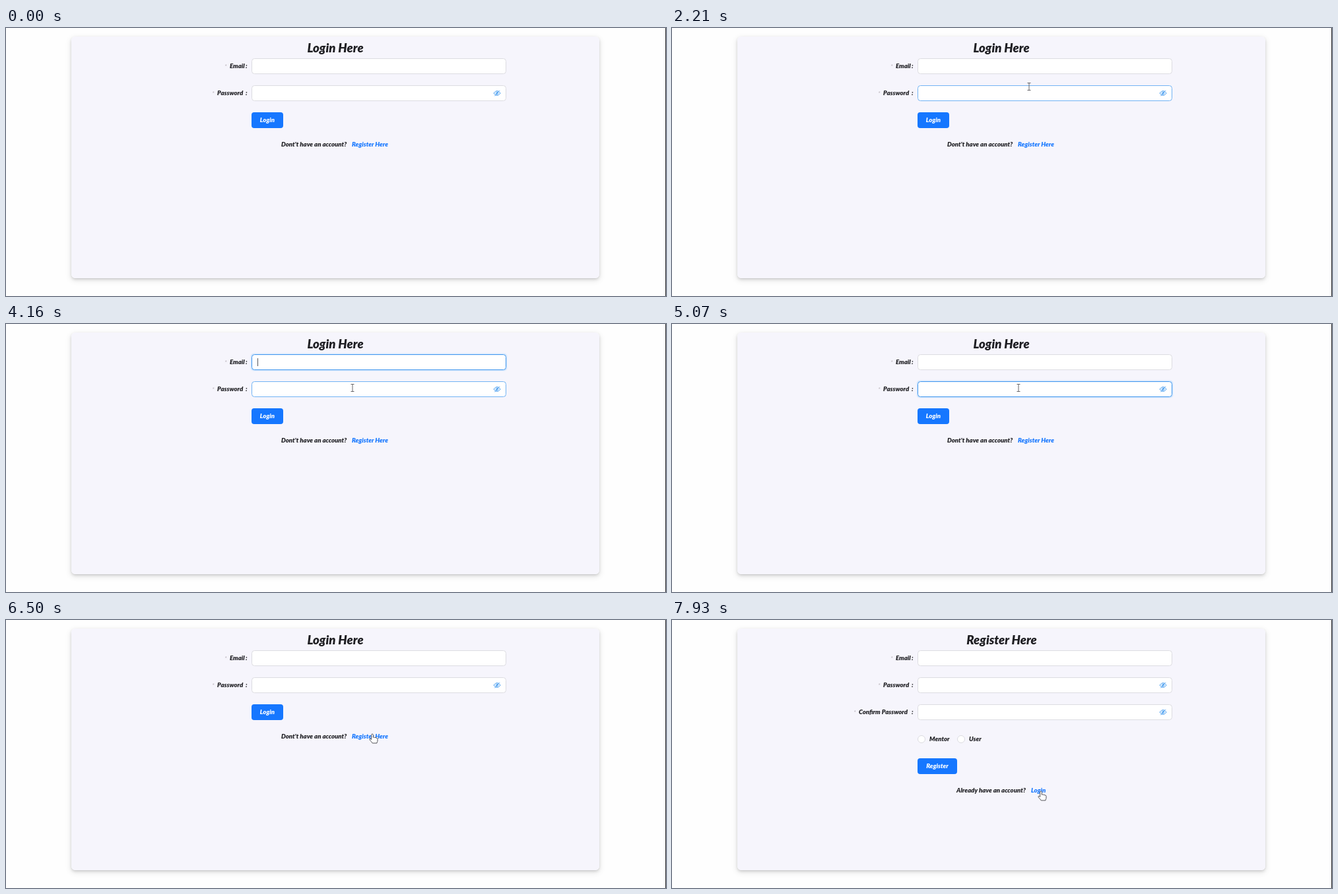
Animation of 1000 by 407 pixels, one loop 8 s. Source, as an HTML page:

```html
<!DOCTYPE html>
<html lang="en">
<head>
<meta charset="utf-8">
<title>Login and register</title>
<style>
html, body { margin: 0; width: 100%; height: 100%; overflow: hidden; background: #fefefe; }
.card, .shadow { position: absolute; left: 99px; top: 13px; width: 800px; height: 367px; border-radius: 6px; box-sizing: border-box; }
.shadow { box-shadow: 0 1px 2px -1px rgba(0,0,0,.16), 0 2px 4px rgba(0,0,0,.13), 0 3px 8px 2px rgba(0,0,0,.07); }
.card { background: #f6f5fc; border: 1px solid transparent; }
svg { position: absolute; left: 0; top: 0; }
text { font: italic 900 9.6px Lato, sans-serif; fill: #1f1f23; }
.title { font-size: 18.6px; text-anchor: middle; }
.star { fill: #b9b4bb; font-weight: 400; }
.link { fill: #1677ff; }
.button { fill: #1677ff; }
.caption { fill: #fff; text-anchor: middle; }
.field, .radio { fill: #fff; stroke: #dcdce1; }
.glow { fill: none; stroke: #0591ff; stroke-opacity: .13; stroke-width: 2; }
.eye { fill: none; stroke: #3492ee; stroke-width: .9; }
.hand { fill: #fff; stroke: #55555a; stroke-linejoin: round; }
.beam { fill: none; stroke: #66666b; }
</style>
</head>
<body>
<div class="shadow" id="shadow"></div>
<div class="card" id="card"></div>
<svg width="1000" height="407" viewBox="0 0 1000 407">
  <g id="shared"></g>
  <g id="login"></g>
  <g id="register"></g>
  <path id="caret" d="M381.5 -6v12" stroke="#55555a"/>
  <g id="pointer">
    <path id="hand" class="hand" d="M-1.3 7V.4a1.3 1.3 0 0 1 2.6 0V4.3q1.2-.8 2.4.3q1.3-.7 2.3.5q1.9-.3 2 1.5V9q0 1.5-1 3v1H.2q-1.4-2.2-4-4.8q-.8-1.6.7-1.8q1 .1 1.8 1.2z"/>
    <path id="beam" class="beam" d="M-2.5-5.5h5M0-5.5v11M-2.5 5.5h5"/>
  </g>
  <path d="M999.5 0v407" stroke="#2b2b2e"/>
</svg>
<script>
const $ = id => document.getElementById(id);
const LOOP = 8000, STEP = 130, REGISTER_AT = 7020;

const text = (x, y, content, kind = '') => `<text class="${kind}" x="${x}" y="${y}">${content}</text>`;
const box = (x, y, w, h, kind, id = '') =>
  `<rect id="${id}" class="${kind}" x="${x}" y="${y}" width="${w}" height="${h}" rx="4"/>`;
const eye = y => `<g class="eye" transform="translate(744 ${y})">
  <path d="M-5 0Q0-7 5 0Q0 7-5 0zM-3.6 4.2L3.8-4.2"/><circle r="1.7"/></g>`;
const field = (id, label, x, y) =>
  text(x - 8, y + 4, '*', 'star') + text(x, y + 3, label) + text(363, y + 3, ':') +
  box(371.5, y - 12.5, 387, 25, 'glow', id + 'Glow') + box(372.5, y - 11.5, 385, 23, 'field', id) +
  (id === 'email' ? '' : eye(y));
const button = (label, y, w) =>
  box(372, y - 12, w, 24, 'button') + text(372 + w / 2, y + 3, label, 'caption');
const radio = (label, x) =>
  `<circle class="radio" cx="${x}" cy="181" r="5.5"/>` + text(x + 12, 184, label);

$('shared').innerHTML = field('email', 'Email', 339, 58) + field('password', 'Password', 320, 99);
$('login').innerHTML = text(499, 36.5, 'Login Here', 'title') + button('Login', 140, 48) +
  text(417, 180, "Dont't have an account?") + text(524, 180, 'Register Here', 'link');
$('register').innerHTML = text(499.5, 36.5, 'Register Here', 'title') +
  field('confirm', 'Confirm Password', 283, 140) + radio('Mentor', 378) + radio('User', 438) +
  button('Register', 222, 60) + text(431, 262, 'Already have an account?') + text(544, 262, 'Login', 'link');
$('confirmGlow').remove();

// Pointer hotspot: time, x, y
const path = [
  [650, 706, 330], [1040, 628, 160], [1430, 552, 122], [1560, 550, 118], [1950, 549, 112],
  [2210, 541, 89], [2730, 528, 60], [3120, 528, 60], [3510, 525, 97], [5200, 525, 97],
  [5850, 564, 161], [6110, 555, 174], [7020, 555, 174], [7800, 559, 261], [LOOP, 559, 261]
];
const within = (t, from, to) => t >= from && t < to;
const show = (id, on) => { $(id).style.display = on ? '' : 'none'; };

function pointerAt(t) {
  const i = Math.max(1, path.findIndex(p => p[0] > t));
  const [t0, x0, y0] = path[i - 1], [t1, x1, y1] = path[i];
  const k = Math.max(0, (t - t0) / (t1 - t0));
  return [x0 + (x1 - x0) * k, y0 + (y1 - y0) * k];
}

function draw(t) {
  const registering = t >= REGISTER_AT;
  show('login', !registering);
  show('register', registering);

  const lift = registering ? Math.min(1, (t - REGISTER_AT) / 200) : 1;
  $('shadow').style.opacity = lift;
  $('card').style.borderColor = `rgba(230,229,235,${1 - lift})`;

  const [x, y] = pointerAt(t);
  const visible = t >= 650;
  const focus = within(t, 2990, 4420) ? 'email' : within(t, 4420, 6240) ? 'password' : '';
  let typing = false;
  for (const [id, cy] of [['email', 58], ['password', 99]]) {
    const hover = visible && !registering && Math.abs(y - cy) < 12;
    typing ||= hover;
    $(id).style.stroke = focus === id ? '#4096ee' : hover ? '#72b3f4' : '';
    show(id + 'Glow', focus === id);
  }

  show('caret', focus && !within(t, 3510, 4160) && !within(t, 5070, 5590) && t < 6110);
  $('caret').setAttribute('transform', `translate(0 ${focus === 'email' ? 58 : 99})`);

  show('pointer', visible);
  show('hand', !typing);
  show('beam', typing);
  $('pointer').setAttribute('transform', `translate(${x} ${y})`);
}

// The screen refreshes in fixed steps
function tick() {
  const t = performance.now() % LOOP;
  draw(Math.floor(t / STEP) * STEP);
  requestAnimationFrame(tick);
}
tick();
</script>
</body>
</html>
```
